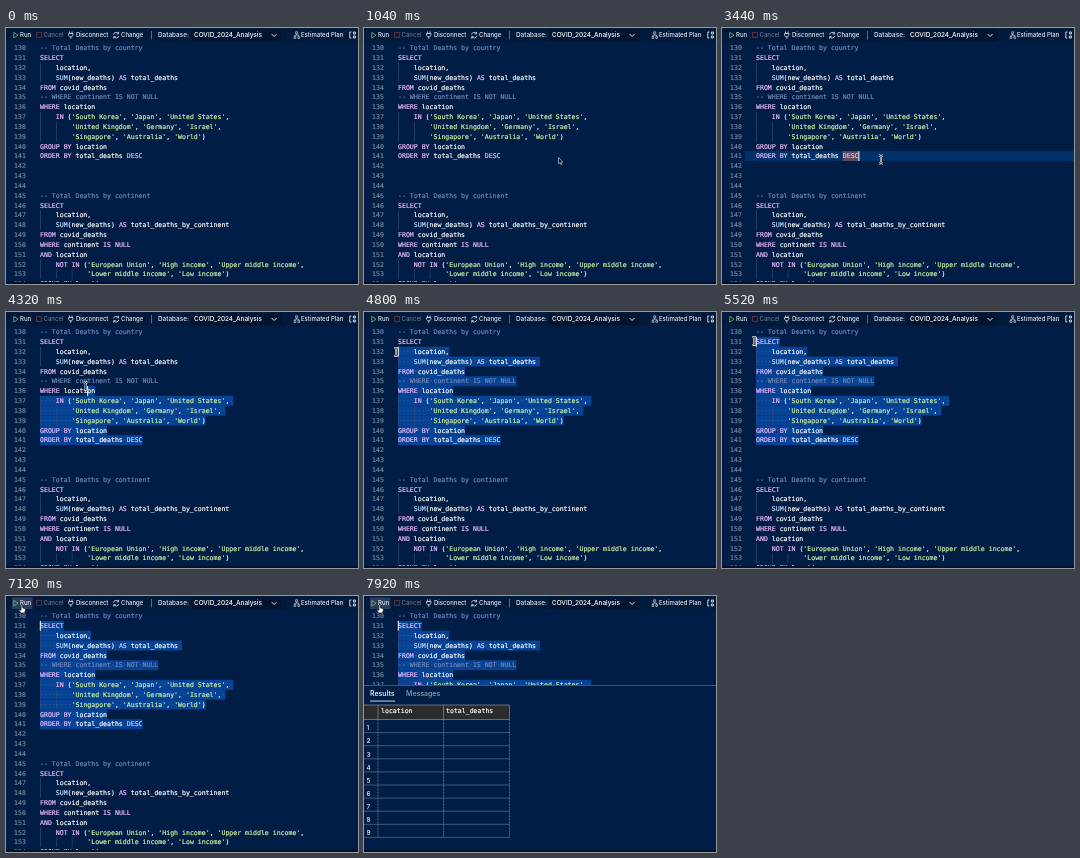
Write an HTML page with a canvas that moves like this. It is 352x256 px and loops after 8 s.

```html
<!DOCTYPE html>
<html lang="en">
<head>
<meta charset="utf-8">
<title>Query editor</title>
<style>
html, body { margin: 0; width: 100%; height: 100%; overflow: hidden; background: #001e45; }
canvas { display: block; width: 352px; height: 256px; }
</style>
</head>
<body>
<canvas id="stage"></canvas>
<script>
const W = 352, H = 256, LOOP = 8000;
const FIRST = 130, TOP = 20, ROW = 9.826, LEFT = 34, CH = 3.945;
const MONO = '6.553px "DejaVu Sans Mono", monospace';
const sans = (size, weight = 500) => `${weight} ${size}px Inter, sans-serif`;

// Moments of the interaction, in ms
const CLICK = 2640, WORD = 2720, DRAG = 3760, RELEASE = 5240, RUN = 7360, PANEL = 7440, RESULTS = 7840;

// Some rows end in a trailing space, which shows when selected
const lines = [
  '-- Total Deaths by country',
  'SELECT',
  '    location,',
  '    SUM(new_deaths) AS total_deaths ',
  'FROM covid_deaths',
  '-- WHERE continent IS NOT NULL',
  'WHERE location',
  "    IN ('South Korea', 'Japan', 'United States', ",
  "        'United Kingdom', 'Germany', 'Israel', ",
  "        'Singapore', 'Australia', 'World')",
  'GROUP BY location',
  'ORDER BY total_deaths DESC',
  '', '', '',
  '-- Total Deaths by continent',
  'SELECT',
  '    location,',
  '    SUM(new_deaths) AS total_deaths_by_continent',
  'FROM covid_deaths',
  'WHERE continent IS NULL',
  'AND location',
  "    NOT IN ('European Union', 'High income', 'Upper middle income',",
  "            'Lower middle income', 'Low income')",
  'GROUP BY location'
];
const LAST = 11; // row where the selection is anchored

const TOKEN = /--.*|'[^']*'|\w+|[^\w\s']+/g;
const KEYWORD = /^(SELECT|AS|FROM|WHERE|IN|GROUP|ORDER|BY|DESC|IS|NOT|NULL|AND)$/;
const tint = s => s.startsWith('--') ? '#7285b7' : s[0] === "'" ? '#d1f1a9'
  : KEYWORD.test(s) ? '#ebbbff' : s === 'SUM' ? '#bbdaff' : '#ffffff';

// Pointer path: time, x, y
const path = [
  [240, 362, 180], [920, 194.5, 129.5], [1360, 194.5, 129.5], [2080, 153.5, 126], [2320, 153.5, 126],
  [2600, 159, 131.5], [3760, 159, 131.5], [4720, 32, 40], [4920, 32, 40], [5160, 33, 30],
  [5440, 33, 30], [6080, 16.5, 9], [6800, 16.5, 9], [7200, 15.8, 9], [8000, 15.8, 9]
];

const canvas = document.getElementById('stage');
const ctx = canvas.getContext('2d');
const dpr = window.devicePixelRatio || 1;
canvas.width = W * dpr;
canvas.height = H * dpr;

const rowY = i => TOP + i * ROW;
const colX = c => LEFT + c * CH;
const clamp = (v, lo, hi) => Math.min(hi, Math.max(lo, v));

function box(x, y, w, h, color) {
  ctx.fillStyle = color;
  ctx.fillRect(x, y, w, h);
}

function text(s, x, y, color, font = MONO) {
  ctx.font = font;
  ctx.fillStyle = ctx.strokeStyle = color;
  ctx.fillText(s, x, y + 2.35);
  if (font === MONO) { // slightly heavier code type
    ctx.lineWidth = 0.18;
    ctx.strokeText(s, x, y + 2.35);
  }
}

function stroke(d, color, width = 0.8) {
  ctx.strokeStyle = color;
  ctx.lineWidth = width;
  ctx.stroke(new Path2D(d));
}

function pointerAt(t) {
  if (t <= path[0][0]) return path[0].slice(1);
  const i = path.findIndex(p => p[0] >= t);
  const [t0, x0, y0] = path[i - 1], [t1, x1, y1] = path[i];
  const u = (t - t0) / (t1 - t0), e = u * u * (3 - 2 * u);
  return [x0 + (x1 - x0) * e, y0 + (y1 - y0) * e];
}

function caretAt(t) {
  if (t < DRAG) return [LAST, lines[LAST].length];
  const [x, y] = pointerAt(Math.min(t, RELEASE));
  const row = clamp(Math.round((y - TOP) / ROW), 1, LAST);
  return [row, clamp(Math.round((x - LEFT) / CH), 0, lines[row].length)];
}

function drawSelection([row, col]) {
  for (let i = row; i <= LAST; i++) {
    const from = i === row ? col : 0, to = lines[i].length;
    box(colX(from), rowY(i) - ROW / 2, (to - from) * CH, ROW + 0.1, '#074394');
    for (let c = from; c < to; c++)
      if (lines[i][c] === ' ') box(colX(c + 0.5) - 0.4, rowY(i) - 0.4, 0.8, 0.8, '#4372b4');
  }
}

function drawEditor(t) {
  const caret = caretAt(t);
  const selecting = caret[0] !== LAST || caret[1] !== lines[LAST].length;
  if (t >= CLICK && !selecting) {
    box(23, rowY(LAST) - ROW / 2, W - 23, ROW, '#00326a');
    if (t >= WORD) box(colX(22), rowY(LAST) - ROW / 2, 4 * CH, ROW, '#5b4a5e');
  }
  if (selecting) drawSelection(caret);
  lines.forEach((line, i) => {
    const y = rowY(i), indent = line.search(/\S/);
    text(String(FIRST + i), 8, y, '#76839a');
    for (let c = 0; c < indent; c += 4) box(colX(c) + 0.2, y - ROW / 2, 0.6, ROW, '#34517f');
    for (const m of line.matchAll(TOKEN)) text(m[0], colX(m.index), y, tint(m[0]));
  });
  if (t >= CLICK) box(colX(caret[1]) - 0.2, rowY(caret[0]) - ROW / 2, 1, ROW, '#ffffff');
}

function drawToolbar(t) {
  const busy = t >= RUN && t < RESULTS;
  const on = '#e4e8ef', off = '#66728a';
  const live = busy ? off : on, small = sans(6), large = sans(6.4);
  const [px, py] = pointerAt(t);
  box(0, 0, W, 14, '#001a3c');
  if (px < 27 && py < 13) box(6, 1.5, 20.5, 11.5, '#2b3d58');
  stroke('M7.8 4.4V10L12 7.2Z', busy ? '#47614f' : '#73c26b');
  text('Run', 14, 7, live, small);
  stroke('M30.6 4.4h5v5h-5z', busy ? '#e0584f' : '#80363c');
  text('Cancel', 37.5, 7, busy ? on : off, small);
  stroke('M63.5 3.5v2M66 3.5v2M62.6 5.5h4.3v2l-1.2 1.2h-1.9l-1.2-1.2zM64.8 8.7v2', on);
  text('Disconnect', 70, 7, on, small);
  stroke('M107.6 6.6a2.6 2.6 0 0 1 4.8-1M112.6 3.8v2h-2M112.7 7.8a2.6 2.6 0 0 1-4.8 1M107.7 10.6v-2h2', on);
  text('Change', 115, 7, on, small);
  box(145, 3, 0.8, 8.5, '#6c7c95');
  text('Database:', 152, 7, on, large);
  box(185, 1.5, 90.5, 11.5, '#001430');
  text('COVID_2024_Analysis', 188, 7, '#ffffff', large);
  stroke('M265.6 6l2.5 2.5 2.5-2.5', on, 1);
  stroke('M289.7 3.8h2v2h-2zM288 8.6h1.8v1.8h-1.8zM291.8 8.6h1.8v1.8h-1.8zM290.7 5.8v1.4M288.9 8.6V7.2h3.8v1.4', live, 0.6);
  text('Estimated Plan', 295, 7, live, small);
  stroke('M345.4 4h-1.6v6h1.6M347.4 4h2v2h-2zM347.4 8h2v2h-2z', on, 0.9);
}

function drawPanel(t) {
  box(0, 89, W, H - 89, '#001e45');
  box(0, 89, W, 0.8, '#4a6288');
  text('Results', 6, 98, '#ffffff', sans(7));
  text('Messages', 42, 98, '#93a0b8', sans(7));
  box(6, 104.6, 25, 0.9, '#dfe5ee');
  if (t < RESULTS) return;

  const x = [0, 14, 79.5, 145.5], y0 = 123.5, step = 13.1, bottom = y0 + 9 * step;
  box(0, 109, x[3], y0 - 109, '#2b2a2c');
  text('location', 17, 115, '#ffffff');
  text('total_deaths', 82, 115, '#ffffff');
  for (let i = 0; i < 9; i++) text(String(i + 1), 2.6, y0 + (i + 0.65) * step, '#e8ecf2', sans(6.5));
  stroke(`M0 109H${x[3]}V${y0}H0M${x[1]} 109V${y0}M${x[2]} 109V${y0}`, '#8a8f98', 0.7);
  for (let i = 1; i <= 9; i++) stroke(`M0 ${y0 + i * step}H${x[3]}`, '#6a7d9c', 0.6);
  ctx.setLineDash([2, 1]);
  for (const cx of x.slice(1)) stroke(`M${cx} ${y0}V${bottom}`, '#7c8ca6', 0.7);
  ctx.setLineDash([]);
}

function drawPointer(t) {
  const [x, y] = pointerAt(t);
  const shape = (d, fill, edge) => {
    const p = new Path2D(d);
    ctx.lineWidth = 0.7;
    ctx.strokeStyle = edge;
    ctx.fillStyle = fill;
    ctx.fill(p);
    ctx.stroke(p);
  };
  ctx.save();
  ctx.translate(x, y);
  if (y < 14) {
    shape('M-.8 0Q0-1 .8 0V3L3.2 3.6Q3.8 4 3.5 5.5L2.8 8H-1.2L-3 5Q-2.6 4-1.6 4.8L-.8 5.4Z', '#ffffff', '#111111');
  } else if (t < CLICK - 160) {
    shape('M0 0V6.2L1.4 5 2.4 7.1 3.4 6.7 2.4 4.6H4.3Z', '#0a0a0a', '#c4ccd8');
  } else {
    const beam = 'M-2-4Q0-4 0-2.8Q0-4 2-4M0-2.8V2.8M-2 4Q0 4 0 2.8Q0 4 2 4';
    stroke(beam, '#ffffff', 2);
    stroke(beam, '#111111', 0.8);
  }
  ctx.restore();
}

function draw(t) {
  ctx.setTransform(dpr, 0, 0, dpr, 0, 0);
  box(0, 0, W, H, '#001e45');
  drawEditor(t);
  drawToolbar(t);
  if (t >= PANEL) drawPanel(t);
  box(0, 254, W, 2, '#00122c');
  drawPointer(t);
}

const start = performance.now();
function tick() {
  draw((performance.now() - start) % LOOP);
  requestAnimationFrame(tick);
}
tick();
</script>
</body>
</html>
```
